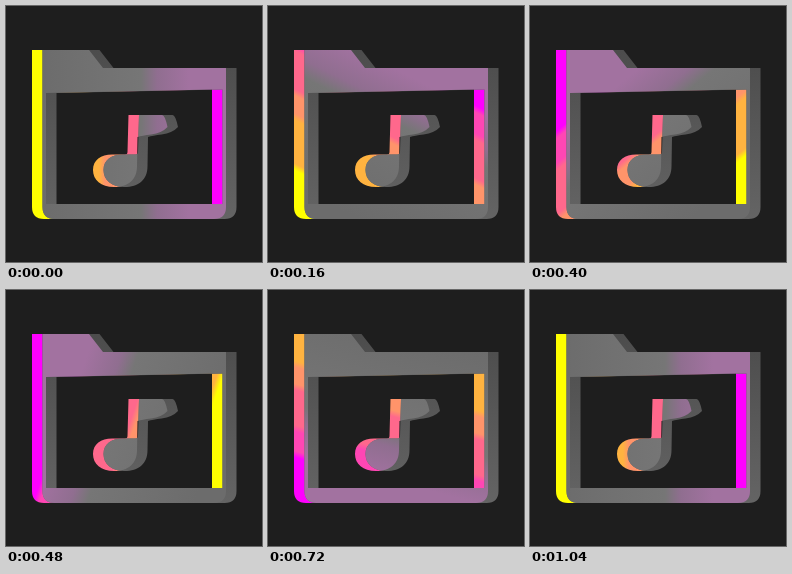
Animation of 256 by 256 pixels, one loop 1.06 s. Source, as an HTML page with a canvas:

```html
<!DOCTYPE html>
<html lang="en">
<head>
<meta charset="utf-8">
<title>Music folder</title>
<style>
html, body { margin: 0; width: 100%; height: 100%; overflow: hidden; background: #1e1e1e; }
canvas { display: block; width: 100vw; height: 100vh; }
</style>
</head>
<body>
<canvas id="stage" width="256" height="256"></canvas>
<script>
const ctx = document.getElementById('stage').getContext('2d');
const LOOP = 1060, STEP = 20, TURN = 52;
const CENTER = { x: 123, y: 128 }, REACH = 100, DEPTH = 10.5;

const back = new Path2D(
  'M26 44H83L97 62H220V201Q220 213 208 213H38Q26 213 26 201Z' +
  'M40 87L206 83.5V198H40Z' +
  'M122.5 109H156Q159 109 161.5 121Q156 127 145 128.5Q136 129.5 131.5 131' +
  'L131 160C131 174 122 181 108 181C95 181 87 174 87 164' +
  'C87 154 95 148.5 106 148.5H119Q121.5 148.5 121.5 146Z');
const front = new Path2D();
front.addPath(back, new DOMMatrix().translate(DEPTH, 0));

// Bands of the wall colour: upper limit along the gradient axis, colour
const bands = [
  [-72, '#ffff00'], [-27, '#ffb340'], [-5, '#ff946a'],
  [35, '#ff688c'], [60, '#ff46b4'], [REACH, '#ff00ff']
];
const wallStops = [];
let low = -REACH;
for (const [high, color] of bands) {
  wallStops.push([low + 3, color], [high - 3, color]);
  low = high;
}
const faceStops = [
  [-90, '#6c6c6c'], [12, '#767676'], [28, '#906e90'], [60, '#a272a0']
];

const shade = ctx.createLinearGradient(0, 44, 0, 213);
shade.addColorStop(0, '#4c4c4c');
shade.addColorStop(1, '#646464');

function axisGradient(dx, dy, stops) {
  const g = ctx.createLinearGradient(
    CENTER.x - dx * REACH, CENTER.y - dy * REACH,
    CENTER.x + dx * REACH, CENTER.y + dy * REACH);
  for (const [pos, color] of stops) g.addColorStop((pos + REACH) / (2 * REACH), color);
  return g;
}

function fill(path, style) {
  ctx.fillStyle = style;
  ctx.fill(path, 'evenodd');
}

function draw(time) {
  const angle = Math.floor((time % LOOP) / STEP) / TURN * 2 * Math.PI;
  const x = Math.cos(angle), y = -1.4 * Math.sin(angle);
  const len = Math.hypot(x, y);
  const dx = x / len, dy = y / len;

  ctx.fillStyle = '#1e1e1e';
  ctx.fillRect(0, 0, 256, 256);
  fill(back, axisGradient(dx, dy, wallStops));
  fill(front, shade);

  // The lit face is where both layers overlap
  ctx.save();
  ctx.clip(back, 'evenodd');
  fill(front, axisGradient(dx, dy, faceStops));
  ctx.restore();
}

const start = performance.now();
function tick() {
  draw(performance.now() - start);
  requestAnimationFrame(tick);
}
tick();
</script>
</body>
</html>
```
